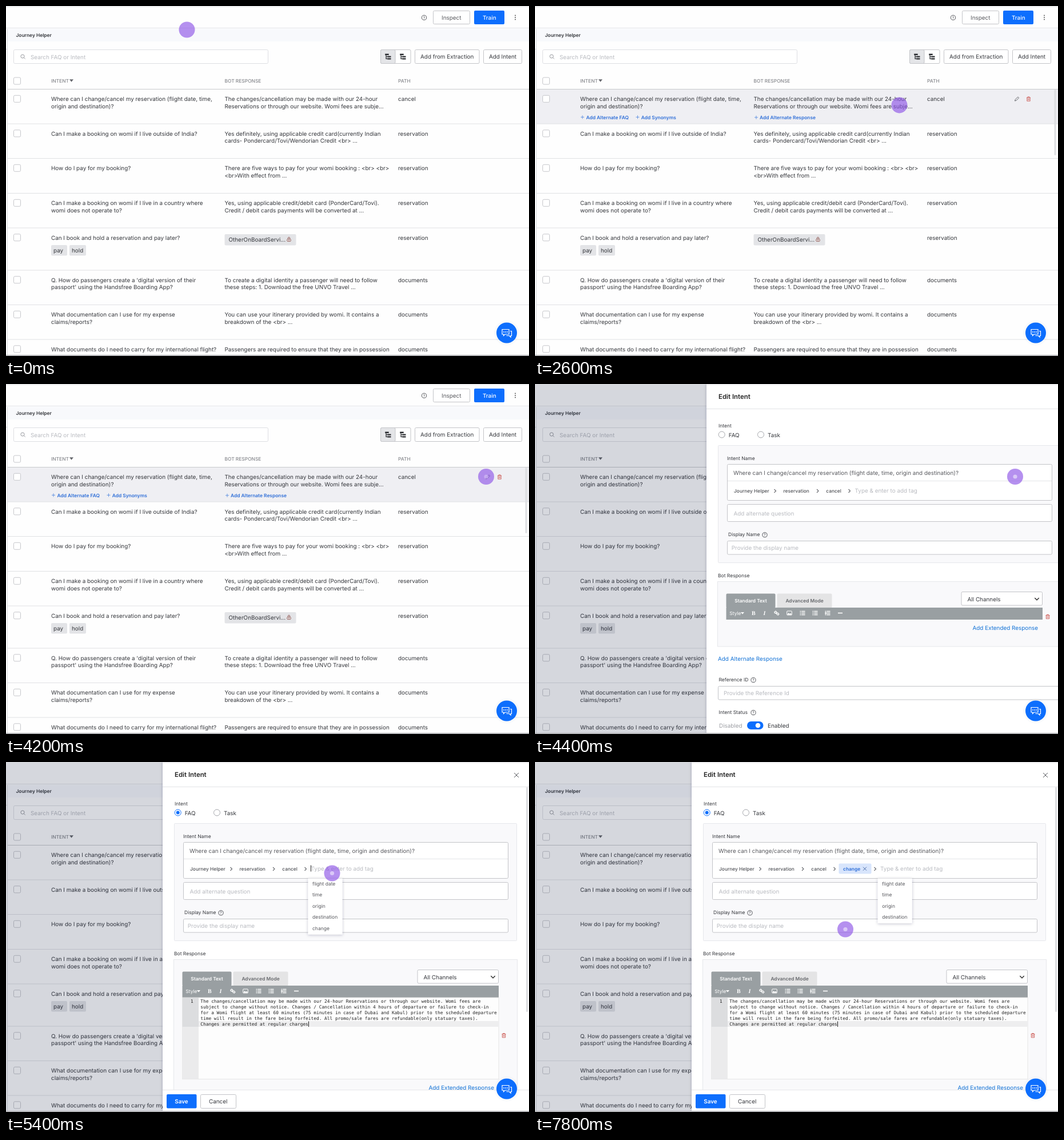
These frames come from a looping animation (915 px wide and 612 px high, 8 s). An HTML page:

```html
<!DOCTYPE html>
<html lang="en">
<head>
<meta charset="utf-8">
<title>Edit intent</title>
<style>
  html, body { margin: 0; width: 100%; height: 100%; overflow: hidden; background: #fff; }
  svg { display: block; width: 100vw; height: 100vh; }
  text { font: 9.89px Inter, sans-serif; fill: #35373c; white-space: pre; text-rendering: geometricPrecision; }
  .small { font-size: 8.5px; }
  .head { font-size: 8.4px; font-weight: 500; fill: #85878c; }
  .bold { font-size: 8.4px; font-weight: 600; }
  .tag { font-size: 8.4px; font-weight: 500; fill: #505257; }
  .title { font-size: 11.4px; font-weight: 600; fill: #222; }
  .hint { fill: #b9bbc0; }
  .field { fill: #58595e; }
  .link { fill: #1272d6; }
  .blue { fill: #2f6fd8; }
  .white { fill: #fff; }
  .mid { text-anchor: middle; }
  .code { font: 7.83px "DejaVu Sans Mono", monospace; fill: #222; }
  .serif { font: bold 10px "Liberation Serif", serif; fill: #fff; }
</style>
</head>
<body>
<svg id="stage" viewBox="0 0 915 612" preserveAspectRatio="none"></svg>
<script>
const BLUE = '#0d6efd', LINE = '#c3c4c8', BAR = '#999fa2';

const escapeText = s => s.replace(/&/g, '&amp;').replace(/</g, '&lt;');
const text = (x, y, s, cls = '') => `<text x="${x}" y="${y}" class="${cls}">${escapeText(s)}</text>`;
const rect = (x, y, w, h, fill, stroke = 'none', r = 0) =>
  `<rect x="${x}" y="${y}" width="${w}" height="${h}" rx="${r}" fill="${fill}" stroke="${stroke}"/>`;
const circle = (x, y, r, fill, stroke = 'none') =>
  `<circle cx="${x}" cy="${y}" r="${r}" fill="${fill}" stroke="${stroke}"/>`;
const path = (d, stroke, width = 1, fill = 'none') =>
  `<path d="${d}" stroke="${stroke}" stroke-width="${width}" fill="${fill}"/>`;
const group = (id, body) => `<g id="${id}">${body}</g>`;

const chevron = (x, y = 187) => path(`M${x - 1.5} ${y - 3}l3 3l-3 3`, '#66686d', 1.1);
const cross = (x, y, r, color) =>
  path(`M${x - r} ${y - r}l${2 * r} ${2 * r}m0 ${-2 * r}l${-2 * r} ${2 * r}`, color);
const plus = (x, y) => path(`M${x - 3} ${y}h6m-3-3v6`, '#5b8ee0', 0.9);
const help = (x, y) => circle(x, y, 4.1, 'none', '#55575c') +
  `<text x="${x}" y="${y + 2.4}" class="mid" style="font-size:6.5px">?</text>`;
const trash = (x, y) =>
  path(`M${x - 3.5} ${y - 2.5}h7m-5 0v-1.3h3v1.3m-4.2 0v6h5.4v-6m-3.6 1.5v3m1.8-3v3`, '#cc5a55', 0.9);
const checkbox = y => rect(13.5, y - 6, 12, 12, '#fff', '#c6c7cb', 2);
const tree = x => path(`M${x - 3} 85v7.3h3m-3-3.7h3`, '#2b2d31', 1.2) +
  path(`M${x - 4.8} 84.8h6.5M${x - 0.5} 88.6h6M${x - 0.5} 92.4h6`, '#2b2d31', 2.4);

// ---- table behind the panel ----
const rows = [
  [145.5, 'cancel', 'Where can I change/cancel my reservation (flight date, time,', 'origin and destination)?',
    'The changes/cancellation may be made with our 24-hour', 'Reservations or through our website. Womi fees are subje...'],
  [206, 'reservation', 'Can I make a booking on womi if I live outside of India?', '',
    'Yes definitely, using applicable credit card(currently Indian', 'cards- Pondercard/Tovi/Wendorian Credit <br> ...'],
  [266.5, 'reservation', 'How do I pay for my booking?', '',
    'There are five ways to pay for your womi booking : <br> <br>', '<br>With effect from ...'],
  [327.5, 'reservation', 'Can I make a booking on womi if I live in a country where', 'womi does not operate to?',
    'Yes, using applicable credit/debit card (PonderCard/Tovi).', 'Credit / debit cards payments will be converted at ...'],
  [388, 'reservation', 'Can I book and hold a reservation and pay later?', '', '', ''],
  [462, 'documents', "Q. How do passengers create a 'digital version of their", 'passport\' using the Handsfree Boarding App?',
    'To create a digital identity a passenger will need to follow', 'these steps: 1. Download the free UNVO Travel ...'],
  [522.5, 'documents', 'What documentation can I use for my expense', 'claims/reports?',
    'You can use your itinerary provided by womi. It contains a', 'breakdown of the <br> ...'],
  [583, 'documents', 'What documents do I need to carry for my international flight?', '',
    'Passengers are required to ensure that they are in possession', '']
];

const tableRow = ([y, where, q1, q2, a1, a2]) =>
  path(`M3 ${y}H915`, y < 150 ? '#c9cacd' : '#e0e1e4') + checkbox(y + 16.8) +
  text(79, y + 20.7, q1) + text(79, y + 33, q2) +
  text(382.5, y + 20.7, a1) + text(382.5, y + 33, a2) + text(686, y + 20.7, where);

const toolbar =
  path('M0 38.5H915', '#e3e4e8') + rect(3, 40, 912, 22, '#f8f9fc') +
  path('M2.5 40V612M0 75.5H2', '#dcdde1') +
  help(731.5, 20.3) +
  rect(747.5, 8.5, 64, 23, '#fff', LINE, 2) + text(779.3, 23.6, 'Inspect', 'mid field') +
  rect(819, 8, 53, 24, BLUE, 'none', 2) +
  `<text x="845.8" y="23.6" class="mid white" style="font-weight:500">Train</text>` +
  [16.5, 20, 23.5].map(y => circle(891, y, 0.9, '#444')).join('') +
  text(17.5, 54, 'Journey Helper', 'bold') +
  rect(13.5, 76.5, 445, 24, '#fff', '#dddee2', 2) +
  circle(29, 88, 3.1, 'none', '#9a9ca1') + path('M31.3 90.3l2.3 2.3', '#9a9ca1') +
  text(43, 92.6, 'Search FAQ or Intent', 'hint') +
  rect(655.5, 76.5, 52.5, 24, '#fff', LINE, 2) + rect(655.5, 76.5, 25.5, 24, '#e4e5e8', LINE, 2) +
  tree(668) + tree(694) +
  rect(715.5, 76.5, 112.5, 24, '#fff', LINE, 2) + text(771.7, 92.3, 'Add from Extraction', 'mid') +
  rect(835.5, 76.5, 67, 24, '#fff', LINE, 2) + text(869, 92.3, 'Add Intent', 'mid') +
  checkbox(131) + text(79, 134, 'INTENT', 'head') +
  path('M111 128.3h7l-3.5 4.5z', 'none', 0, '#66686d') +
  text(382.5, 134, 'BOT RESPONSE', 'head') + text(686, 134, 'PATH', 'head');

const chips =
  rect(79, 418, 28, 18.5, '#e3e4e7', 'none', 2) + text(83, 431, 'pay') +
  rect(111, 418, 29, 18.5, '#e3e4e7', 'none', 2) + text(115, 431, 'hold') +
  rect(382.5, 399, 125, 19.5, '#e3e4e7', 'none', 2) + text(389.5, 412.3, 'OtherOnBoardServi...') +
  rect(491.8, 407.5, 6.4, 4, '#eee', '#96605c', 1) + path('M493.3 407v-2h3.4v2m-1.7-2v-1.5m-1.5 6h3', '#96605c', 0.9);

const hoverTools =
  plus(83, 194.3) + text(89.5, 197.6, 'Add Alternate FAQ', 'bold blue') +
  plus(179.5, 194.3) + text(185.7, 197.6, 'Add Synonyms', 'bold blue') +
  plus(387, 194.8) + text(393, 198, 'Add Alternate Response', 'bold blue') +
  path('M839.5 166l.8-2.6l4.5-4.5l1.8 1.8l-4.5 4.5z', '#55575c', 0.9) + trash(863.5, 162.7) +
  rect(908.5, 146, 3, 115, '#dcdde0', 'none', 1.5);

// ---- edit panel ----
const radio = (x, on) => circle(x, 88.5, 5.5, '#fff', on ? BLUE : '#a4a6ab') + (on ? circle(x, 88.5, 3, BLUE) : '');

const intentForm =
  text(295, 75.6, 'Intent', 'small') + text(312.7, 92.8, 'FAQ') + radio(369, false) + text(381, 92.8, 'Task') +
  rect(294.5, 107.5, 599, 205, '#f9f9fb', '#e6e7eb', 1) +
  text(310, 132.6, 'Intent Name', 'small') +
  rect(310.5, 140.5, 568, 63, '#fff', LINE, 2) + path('M311 169.5H878', '#e4e5e8') +
  text(321, 159.2, 'Where can I change/cancel my reservation (flight date, time, origin and destination)?', 'field') +
  text(322, 189.7, 'Journey Helper', 'tag') + chevron(394) + text(408.5, 189.7, 'reservation', 'tag') +
  chevron(468.5) + text(483.3, 189.7, 'cancel', 'tag') + chevron(524) +
  rect(310.5, 210.5, 568, 30, '#fff', LINE, 2) + text(321.5, 229.7, 'Add alternate question', 'hint') +
  text(312, 266.2, 'Display Name', 'small') + help(376, 263.8) +
  rect(310.5, 274.5, 568, 23.5, '#fff', LINE, 2) + text(317.8, 289.6, 'Provide the display name', 'hint');

const listIcon = x => [397.5, 400.5, 403.5].map(y =>
  path(`M${x - 4.5} ${y}h1.8m1 0h6.2`, '#fff', 1.4)).join('');

const responseTools =
  rect(308.5, 366.5, 86, 25, BAR, 'none', 2) + text(351.5, 382.3, 'Standard Text', 'bold white mid') +
  rect(397.5, 366.5, 96, 25, '#e4e4e5', 'none', 2) +
  `<text x="445.5" y="382.3" class="bold mid" style="fill:#66686c">Advanced Mode</text>` +
  rect(720, 363.5, 141.5, 23.5, '#fff', LINE, 2) + text(730.5, 379.6, 'All Channels') +
  path('M848.3 374l3.7 3.7l3.7-3.7', '#333', 1.5) +
  rect(308.5, 391, 553.5, 21, BAR) + text(314.3, 403.6, 'Style', 'small white') +
  path('M334 399h6l-3 3.6z', 'none', 0, '#fff') +
  text(353, 404, 'B', 'serif') + `<text x="373.5" y="404" class="serif" style="font-style:italic">I</text>` +
  path('M393 398.5l2-1.3l2 2l-1.3 2l-2.5-1zM397 401l2-.8l1.8 2l-1.3 1.8l-2.3-1z', '#fff', 1.3) +
  rect(414.7, 397, 8.6, 7, 'none', '#fff', 1) + path('M415 403.5l2.5-3.5l2 2l1.5-1.5l2.3 3z', 'none', 0, '#fff') +
  listIcon(442) + listIcon(464) + listIcon(486) + path('M482 399l2.5 1.6l-2.5 1.6z', '#fff', 1) +
  path('M504 400.5h8', '#fff', 1.6);

const codeLines = [
  'The changes/cancellation may be made with our 24-hour Reservations or through our website. Womi fees are',
  'subject to change without notice. Changes / Cancellation within 4 hours of departure or failure to check-in',
  'for a Womi flight at least 60 minutes (75 minutes in case of Dubai and Kabul) prior to the scheduled departure',
  'time will result in the fare being forfeited. All promo/sale fares are refundable(only statuary taxes).',
  'Changes are permitted at regular charges'
];
const editor =
  rect(308.5, 412, 553.5, 142.5, '#fdfdfd', '#e6e6e6') + rect(308.5, 412, 28.5, 142.5, '#ebebec') +
  rect(308.5, 412, 28.5, 51, '#dcdddf') + rect(337, 453, 525, 10, '#eeeeef') + text(323, 421, '1', 'code') +
  codeLines.map((s, i) => text(340.3, 421 + 10 * i, s, 'code')).join('') +
  path('M529.5 453.5v9.5', '#222');

const lowerForm =
  text(739.5, 430.3, 'Add Extended Response', 'link') +
  text(294, 484.3, 'Add Alternate Response', 'link') +
  text(295.5, 520, 'Reference ID', 'small') + help(356, 517.6) +
  rect(294.5, 528.5, 599, 23.5, '#fff', LINE, 2) + text(304, 544, 'Provide the Reference Id', 'hint') +
  text(295.5, 577, 'Intent Status', 'small') + help(356, 574.6) +
  `<text x="296" y="600.6" style="fill:#9b9da2">Disabled</text>` +
  rect(345, 590, 28.5, 14, BLUE, 'none', 7) + circle(364, 597, 4.3, '#fff') + text(381, 600.6, 'Enabled');

const footer =
  rect(274, 574, 641, 38, '#fff') + path('M274 573.5H915', '#e6e7ea') +
  rect(281, 581, 52.5, 24.5, BLUE, 'none', 2) +
  `<text x="307" y="597" class="mid white" style="font-weight:600">Save</text>` +
  rect(340.5, 581.5, 62, 24, '#fff', LINE, 2) + text(371.2, 597, 'Cancel', 'mid') +
  cross(893, 23, 4, '#55575c') + rect(910, 44, 3, 393, '#dcdde0', 'none', 1.5);

const menu = (x, items) =>
  `<g filter="url(#soft)">${rect(x, 203.5, 60, items.length * 19.5 + 0.5, '#fff')}</g>` +
  items.map((s, i) => text(x + 7.5, 216 + 19.45 * i, s, 'small field')).join('');
const options = ['flight date', 'time', 'origin', 'destination'];

const panel =
  `<g filter="url(#soft)">${rect(274, -10, 680, 640, '#fff')}</g>` +
  intentForm +
  group('blankRadio', radio(300.7, false)) + group('faqRadio', radio(300.7, true)) +
  text(294, 338, 'Bot Response', 'small') +
  `<rect id="responseBox" x="293.5" y="345.5" width="601" fill="#f9f9fb" stroke="#e6e7eb"/>` +
  responseTools + group('editor', editor) + group('lowerForm', lowerForm) +
  group('panelTrash', trash(871, 407)) +
  path('M274 43.5H915', '#e2e3e6') + text(295, 26.4, 'Edit Intent', 'title') +
  group('footer', footer) +
  group('placeholder', text(533.6, 190, 'Type & enter to add tag', 'hint')) +
  group('newTag', rect(531.5, 177.5, 57, 18, '#d8e5fc', 'none', 2) + text(539, 189.8, 'change', 'bold blue') +
    cross(577, 186.7, 3, '#4a6ca8') + chevron(595)) +
  group('menuBefore', menu(528.5, [...options, 'change'])) +
  group('menuAfter', menu(599.7, options)) +
  group('caret', path('M533.5 180.5v11', '#222'));

const chat =
  circle(876, 571.5, 22, 'rgba(30,50,110,.02)') + circle(876, 571.5, 18, BLUE) +
  path('M868 565.5h12v8.5h-7l-2.5 2.5v-2.5h-2.5z', '#fff', 1.2) +
  path('M882 568.5h2.5v8h-1.5v2.5l-2.5-2.5h-5', '#fff', 1.2) +
  [871, 874, 877].map(x => circle(x, 570, 0.9, '#fff')).join('');

document.getElementById('stage').innerHTML =
  `<defs><filter id="soft" x="-30%" y="-30%" width="160%" height="160%">
    <feDropShadow dx="0" dy="1" stdDeviation="2.5" flood-color="#1b2540" flood-opacity=".25"/></filter></defs>` +
  rect(0, 0, 915, 612, '#fefefe') +
  group('hoverRow', rect(3, 146, 912, 60, '#efeff3')) +
  toolbar + rows.map(tableRow).join('') + chips + group('hoverTools', hoverTools) +
  group('shade', rect(0, 0, 915, 612, 'rgba(10,20,55,.165)')) +
  group('panel', panel) + chat +
  path('M0 1H915', '#d9dadd') + rect(0, 610, 915, 2, '#b4b5b8') +
  group('cursor', circle(0, 0, 14, 'rgba(141,84,230,.65)')) + group('press', circle(0, 0, 3.6, '#dac8f7'));

// ---- motion ----
const $ = id => document.getElementById(id);
const clamp = v => Math.max(0, Math.min(1, v));
const progress = (t, from, to) => clamp((t - from) / (to - from));
const show = (id, on) => { $(id).style.display = on ? '' : 'none'; };
const move = (id, x, y) => $(id).setAttribute('transform', `translate(${x} ${y})`);

// start, end, destination x, y
const moves = [[0, 1150, 557, 178], [2200, 3320, 840, 162], [4600, 5250, 570.5, 194.5], [5700, 6700, 543, 292.5]];
const presses = [[4120, 4700], [5200, 5900], [6650, 8200]];
const SLIDE = 4210, LOADED = 4550, OPEN = 5350, TAGGED = 6950;

function cursorAt(t) {
  let [x, y] = [316.5, 41.5];
  for (const [from, to, tx, ty] of moves) {
    const k = (1 - Math.cos(Math.PI * progress(t, from, to))) / 2;
    x += (tx - x) * k;
    y += (ty - y) * k;
  }
  return [x, y];
}

function draw(t) {
  const [x, y] = cursorAt(t);
  move('cursor', x, y);
  move('press', x, y);
  $('press').style.opacity = Math.max(...presses.map(([a, b]) =>
    progress(t, a, a + 150) * (1 - progress(t, b - 150, b))));

  const sliding = t >= SLIDE, loaded = t >= LOADED, tagged = t >= TAGGED, open = t >= OPEN;
  const hover = y > 146 && !sliding;
  show('hoverRow', hover);
  show('hoverTools', hover);
  $('shade').style.opacity = progress(t, SLIDE, SLIDE + 150);

  show('panel', sliding);
  move('panel', 641 * (1 - progress(t, SLIDE, SLIDE + 291)) ** 3, 0);
  show('blankRadio', !loaded);
  for (const id of ['faqRadio', 'editor', 'footer']) show(id, loaded);
  $('responseBox').setAttribute('height', loaded ? 256 : 113.5);
  move('lowerForm', 0, loaded ? 142.5 : 0);
  move('panelTrash', 0, loaded ? 71.3 : 0);

  show('newTag', tagged);
  show('menuBefore', open && !tagged);
  show('menuAfter', tagged);
  move('placeholder', tagged ? 70.5 : 0, 0);
  move('caret', tagged ? 70 : 0, 0);
  show('caret', open && (t - (tagged ? TAGGED : OPEN)) % 1000 < 500);
}

function tick() {
  draw(performance.now() % 8000);
  requestAnimationFrame(tick);
}
tick();
</script>
</body>
</html>
```
